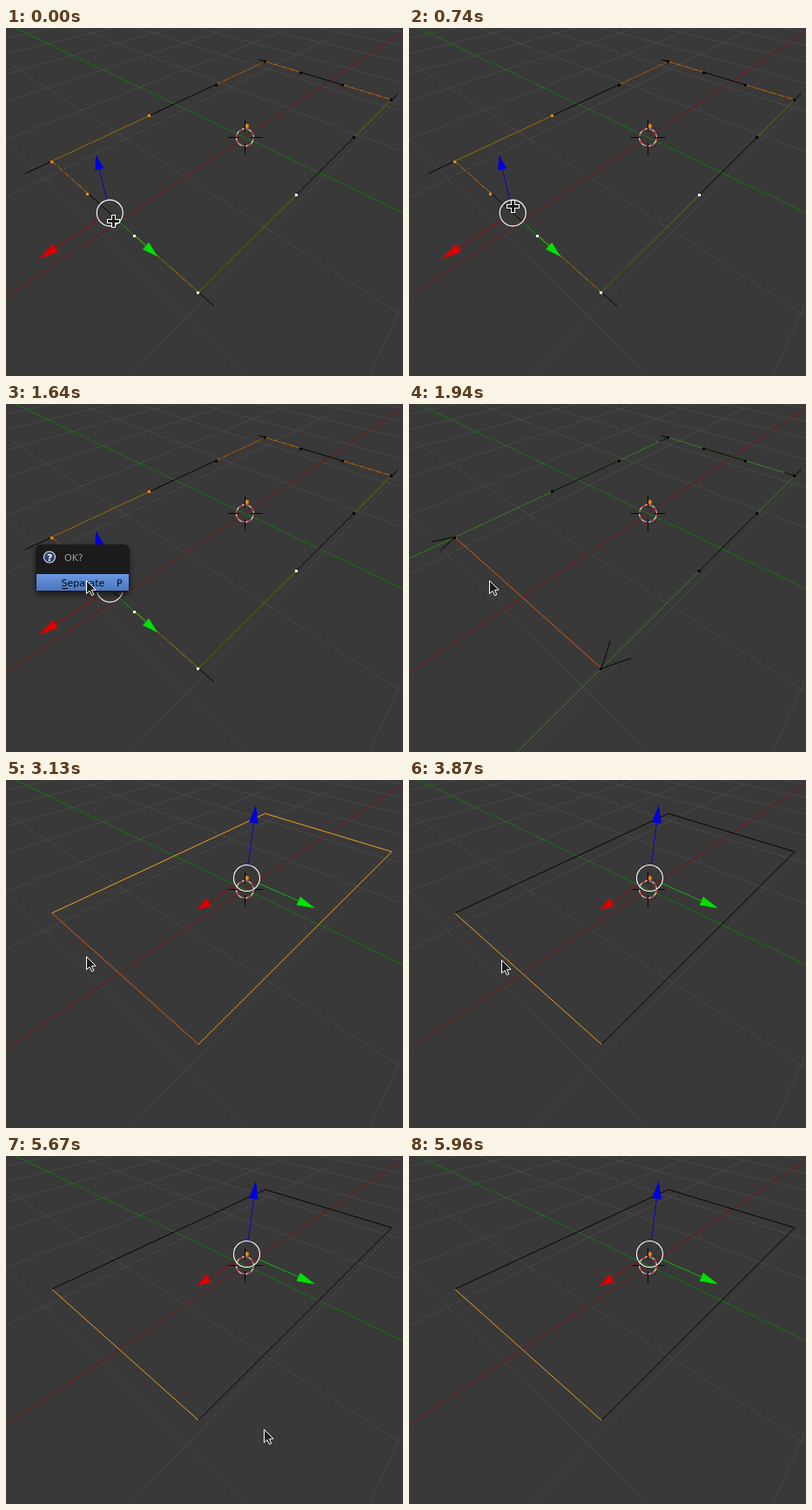
These frames come from a looping animation (456x399 px, 6260 ms). An HTML page with a canvas:

```html
<!DOCTYPE html>
<html lang="en">
<head>
<meta charset="utf-8">
<title>Curve separate</title>
<style>
html, body { margin: 0; width: 100%; height: 100%; overflow: hidden; background: #393939; }
canvas { display: block; width: 456px; height: 399px; }
</style>
</head>
<body>
<canvas id="view" width="456" height="399"></canvas>
<script>
const W = 456, H = 399, LOOP = 6260, TICK = 149.1;
const ctx = document.getElementById('view').getContext('2d');
const BLACK = '#050505', DARK = '#1c1c1c', WHITE = '#ffffff';
const ORANGE = '#e25a0c', AMBER = '#f0a01e', LEAF = '#34821c', OLIVE = '#788a0a';

// Perspective of the ground plane: origin and the two vanishing points
const ORIGIN = [274.5, 125.5], VAN_X = [654, -127.5], VAN_Y = [-265, -131];

function project(x, y) {
  const s = 0.1517 * x, t = 0.1445 * y;
  return ORIGIN.map((o, i) => (o + s * VAN_X[i] + t * VAN_Y[i]) / (1 + s + t));
}

const mix = (a, b, k) => a + (b - a) * k;

// Curve rectangle on the plane; a handle sits k of the way along a side
const NEAR = -1.817, FAR = 2.269, RIGHT = -0.939, LEFT = 1.2215;
const corners = [[NEAR, LEFT], [FAR, LEFT], [FAR, RIGHT], [NEAR, RIGHT]];
const side = (p, q, k) => project(mix(p[0], q[0], k), mix(p[1], q[1], k));
const sides = corners.map((p, i) => {
  const q = corners[(i + 1) % 4];
  return [0, 1 / 3, 2 / 3, 1].map(k => side(p, q, k));
});
const [A, B, C, D] = sides.map(s => s[0]);

function line(p, q, color, dash = []) {
  ctx.beginPath();
  ctx.moveTo(...p);
  ctx.lineTo(...q);
  ctx.setLineDash(dash);
  ctx.strokeStyle = color;
  ctx.lineWidth = 1;
  ctx.stroke();
  ctx.setLineDash([]);
}

// Two colours taking turns along one line
function blend(p, q, under, over) {
  line(p, q, under);
  line(p, q, over, [5, 5]);
}

function path(points, color) {
  points.slice(1).forEach((p, i) => line(points[i], p, color));
}

function poly(points, fill) {
  ctx.beginPath();
  points.forEach(p => ctx.lineTo(...p));
  ctx.closePath();
  ctx.fillStyle = fill;
  ctx.fill();
}

function disc(x, y, r, fill) {
  ctx.beginPath();
  ctx.arc(x, y, r, 0, 7);
  ctx.fillStyle = fill;
  ctx.fill();
}

function ring(x, y, r, color, dash = []) {
  ctx.beginPath();
  ctx.arc(x, y, r, 0, 7);
  ctx.setLineDash(dash);
  ctx.strokeStyle = color;
  ctx.lineWidth = 1.1;
  ctx.stroke();
  ctx.setLineDash([]);
}

function dots(points, color) {
  ctx.fillStyle = color;
  for (const [x, y] of points) ctx.fillRect(Math.round(x) - 2, Math.round(y) - 1, 3, 3);
}

function ray(van, p, color) {
  line(van, p.map((v, i) => mix(van[i], v, 6)), color);
}

function drawGround() {
  ctx.fillStyle = '#393939';
  ctx.fillRect(0, 0, W, H);
  for (let k = -4; k <= 8; k++) {
    if (!k) continue;
    ray(VAN_Y, project(k, 0), '#484848');
    ray(VAN_X, project(0, k), '#484848');
  }
  ray(VAN_X, ORIGIN, '#7a1616');
  ray(VAN_Y, ORIGIN, '#107a10');
}

function drawCursor3d() {
  const [x, y] = ORIGIN;
  disc(276.5, 112.5, 3, '#5c3c10');
  disc(276.5, 112.5, 2.4, '#e08a20');
  ring(x, y, 10, '#e8e8e8');
  ring(x, y, 10, '#d01818', [4, 3.85]);
  for (const s of [-1, 1]) {
    line([x + 7 * s, y], [x + 20 * s, y], BLACK);
    line([x, y + 7 * s], [x, y + 20 * s], BLACK);
  }
}

function arm(center, tip, color, shaft) {
  const dx = tip[0] - center[0], dy = tip[1] - center[1], len = Math.hypot(dx, dy);
  const on = (d, w) => [center[0] + (dx * d - dy * w) / len, center[1] + (dy * d + dx * w) / len];
  const base = len * 0.755;
  line(on(15, 0), on(base, 0), shaft);
  poly([tip, on(base, 5.3), on(base, -5.3)], color);
}

function gizmo(center, x, y, z) {
  arm(center, z, '#0000dc', '#0808b8');
  arm(center, x, '#dc0000', '#a80808');
  arm(center, y, '#00e000', '#10b810');
  ring(...center, 15, WHITE);
}

// Direction mark on a curve point: two arms 45 degrees off the heading
function mark(corner, heading) {
  const [x, y] = corners[corner];
  for (const turn of [-45, 45]) {
    const r = (heading + turn) * Math.PI / 180;
    line(project(x, y), project(x + 0.29 * Math.cos(r), y + 0.145 * Math.sin(r)), BLACK);
  }
}

function marks(...headings) {
  headings.forEach((h, i) => mark(i, h));
}

function sceneEdit() {
  const [ab, bc, cd, da] = sides;
  marks(225, 135, 45, 315);
  sides.forEach(s => path(s, BLACK));
  line(ab[0], ab[1], '#a88010');
  blend(ab[2], ab[3], '#b4581a', '#8c6414');
  blend(bc[0], bc[1], '#c85a10', '#96701a');
  blend(bc[2], bc[3], '#c85a10', '#96701a');
  line(cd[0], cd[1], OLIVE);
  line(cd[2], cd[3], OLIVE);
  blend(da[0], da[1], OLIVE, '#c06414');
  blend(da[2], da[3], '#c06414', '#a07814');
  drawCursor3d();
  gizmo(side(corners[0], corners[3], 0.5), [37, 265], [174, 262], [103.5, 146]);
  dots([ab[2], B, bc[1], bc[2], C, cd[1]], BLACK);
  dots([A, ab[1], da[2]], '#f08a1c');
  dots([cd[2], D, da[1]], WHITE);
}

function sceneSplit() {
  const open = sides.slice(0, 3);
  line(A, side(corners[0], corners[1], -1 / 3), LEAF);
  line(D, side(corners[3], corners[2], -1 / 3), LEAF);
  for (const s of open) {
    line(s[0], s[3], LEAF);
    line(s[1], s[2], BLACK);
  }
  line(A, D, ORANGE);
  marks(180, 135, 45, 0);
  dots(open.flat(), BLACK);
  drawCursor3d();
}

function sceneObject(main, cut) {
  path([A, B, C, D], main);
  line(A, D, cut);
  drawCursor3d();
  gizmo([276.5, 112.5], [219, 149], [355, 147], [287, 28.5]);
}

function text(s, x, y, color, weight = '') {
  ctx.font = weight + ' 11px "DejaVu Sans", sans-serif';
  ctx.fillStyle = color;
  ctx.fillText(s, x, y);
}

function drawMenu() {
  ctx.save();
  ctx.shadowColor = 'rgba(0,0,0,.55)';
  ctx.shadowBlur = 7;
  ctx.shadowOffsetY = 3;
  ctx.beginPath();
  ctx.roundRect(34, 161, 108, 55, 6);
  ctx.fillStyle = '#1b1b1b';
  ctx.fill();
  ctx.restore();
  disc(50, 175.5, 6.5, '#2c4470');
  ring(50, 175.5, 6.5, '#dde4ee');
  text('?', 46.9, 179.6, WHITE, 'bold');
  text('OK?', 67, 180, '#9c9c9c');
  const g = ctx.createLinearGradient(0, 195, 0, 214);
  g.addColorStop(0, '#6a98e2');
  g.addColorStop(1, '#4a76bc');
  ctx.fillStyle = g;
  ctx.fillRect(35, 195, 106, 19);
  text('Separate', 63.5, 209, BLACK);
  text('P', 127, 209, BLACK);
  ctx.fillRect(64, 211, 7, 1);
}

function drawCross(x, y) {
  const plus = (r, w) => {
    ctx.fillRect(x - r, y - w, 2 * r + 1, 2 * w + 1);
    ctx.fillRect(x - w, y - r, 2 * w + 1, 2 * r + 1);
  };
  ctx.fillStyle = WHITE;
  plus(7, 2);
  ctx.fillStyle = DARK;
  plus(6, 1);
}

function drawArrow(x, y) {
  const shape = [[0, 0], [0, 15], [3.5, 11.8], [6, 17], [8.3, 16], [6, 10.9], [10.6, 10.6]];
  poly(shape.map(p => [x + 0.5 + p[0], y + 0.5 + p[1]]), DARK);
  ctx.strokeStyle = WHITE;
  ctx.lineWidth = 1;
  ctx.stroke();
}

// Scenes by the tick they begin on
const scenes = [
  { from: 0, draw: sceneEdit },
  { from: 8, draw: () => { sceneEdit(); drawMenu(); } },
  { from: 13, draw: sceneSplit },
  { from: 21, draw: () => sceneObject(AMBER, ORANGE) },
  { from: 26, draw: () => sceneObject(BLACK, AMBER) }
];

// Pointer glides: first tick, number of ticks, end point, sideways bow
const glides = [
  { from: 4, n: 2, to: [119, 204] },
  { from: 8, n: 1, to: [118, 202] },
  { from: 11, n: 1, to: [92, 202] },
  { from: 24, n: 2, to: [106, 206] },
  { from: 28, n: 4, to: [251, 177], bow: 16 },
  { from: 38, n: 3, to: [391, 386], bow: 80 }
];

const ease = u => (1 - (1 - u) ** 3) ** 3.2;

function pointer(tick) {
  let x = 123, y = 221;
  for (const { from, n, to, bow = 0 } of glides) {
    if (tick < from) break;
    const e = ease(Math.min(1, (tick - from + 1) / n));
    x = mix(x, to[0], e);
    y = mix(y, to[1], e) + bow * Math.sin(Math.PI * e);
  }
  return [Math.round(x), Math.round(y)];
}

const start = performance.now();
let shown = -1;

function frame() {
  const t = Math.max(0, performance.now() - start) % LOOP;
  const tick = Math.floor((t + 6) / TICK);
  if (tick !== shown) {
    shown = tick;
    drawGround();
    scenes.filter(s => s.from <= tick).pop().draw();
    if (tick < 40) (tick < 8 ? drawCross : drawArrow)(...pointer(tick));
  }
  requestAnimationFrame(frame);
}

frame();
</script>
</body>
</html>
```
